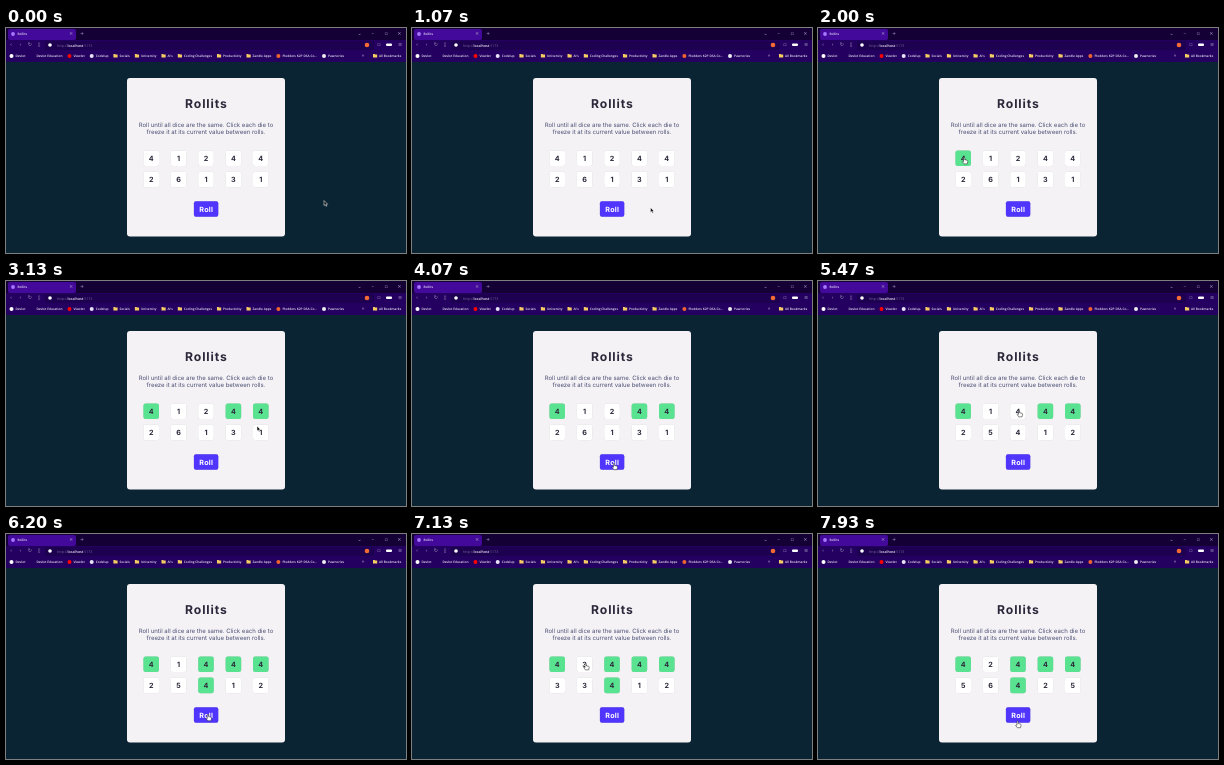
An HTML page that plays this animation: 400 by 225 pixels, repeating every 8 s.

```html
<!DOCTYPE html>
<html lang="en">
<head>
<meta charset="utf-8">
<title>Rollits</title>
<style>
  html, body { margin: 0; width: 100%; height: 100%; overflow: hidden; background: #0b2434; }
  svg { display: block; width: 100vw; height: 100vh; }
  text { text-rendering: geometricPrecision; }
  .ui { font: 600 3.2px "Open Sans", "Noto Sans", sans-serif; fill: #efeaf8; }
  .glyph { font: 5px "DejaVu Sans", sans-serif; text-anchor: middle; dominant-baseline: central; fill: #a99cc4; }
  .game { font-family: Inter, Arial, sans-serif; text-anchor: middle; }
  .bold { font-size: 7.2px; font-weight: 700; }
  .die rect, #roll { filter: drop-shadow(0 .6px .5px #0003); }
</style>
</head>
<body>
<svg viewBox="0 0 400 225">
  <rect width="400" height="225" fill="#0b2434"/>
  <g id="chrome" class="ui">
    <rect width="400" height="34" fill="#240060"/>
    <rect width="400" height="12" fill="#150036"/>
    <rect x="2" y="1" width="68" height="11" rx="2" fill="#43099a"/>
    <rect x="39" y="13" width="329" height="9" rx="2" fill="#1d0050"/>
    <circle cx="7" cy="6" r="1.9" fill="#a878ff"/>
    <text x="11.5" y="7.2">Rollits</text>
    <circle cx="44" cy="17" r="1.8" fill="#fff"/>
    <text x="51" y="18.6" font-size="3.6" font-weight="400" fill="#75659a">http://<tspan
      font-weight="600" fill="#f2eefa">localhost</tspan>:5173</text>
    <circle cx="361" cy="17" r="2.3" fill="#f26b35"/>
    <rect x="380" y="15.5" width="6" height="2.500" rx="1" fill="#fff"/>
  </g>

  <g class="game">
    <rect x="121" y="50" width="158" height="158.600" rx="3" fill="#f4f2f5"/>
    <text x="200.400" y="80.200" font-size="12.200" font-weight="700" letter-spacing=".9" fill="#2b283a">Rollits</text>
    <g font-size="6" fill="#4a4e74">
      <text x="200" y="99.300">Roll until all dice are the same. Click each die to</text>
      <text x="200" y="106.300">freeze it at its current value between rolls.</text>
    </g>
    <g id="dice" class="bold" fill="#2b283a"></g>
    <rect id="roll" x="187.900" y="173.200" width="24.400" height="15.600" rx="2" fill="#5035ff"/>
    <text class="bold" x="200.200" y="183.700" letter-spacing=".2" fill="#fff">Roll</text>
  </g>

  <g id="cursor" stroke-width=".5" stroke-linejoin="round">
    <path id="arrow" fill="#111" stroke="#fff" d="M0 0V5L1.200 4 2 5.800 2.900 5.400 2.100 3.700H3.600z"/>
    <path id="hand" fill="#fff" stroke="#111" d="M-.6 .5Q0-.4 .6 .5V2.500L3 3.100Q3.700 3.300 3.600 4.300L3 6.700H-.2L-1.800 4.500Q-1.600 3.500-.6 4.300z"/>
  </g>
</svg>
<script>
const $ = id => document.getElementById(id);
const LOOP = 8000, FRAME = 1000 / 15;

// Browser bar
const glyph = (char, x, y) => `<text class="glyph" x="${x}" y="${y}">${char}</text>`;
const row = (chars, x, step, y) => [...chars].map((c, i) => glyph(c, x + i * step, y)).join("");
$("chrome").innerHTML += row("×+", 65, 11, 6) + row("⌄–▫×", 353.5, 13.3, 6) +
  row("‹›↻▯", 5, 9.4, 17) + row("▫", 373, 0, 17) + row("≡", 394, 0, 17);

function bookmark(x, label, color) {
  const icon = color ? `<circle cx="${x}" cy="28" r="2" fill="${color}"/>`
    : `<path d="M${x - 2} 26h1.600l.6.600h2v3h-4.200z" fill="#f5cd62"/>`;
  $("chrome").insertAdjacentHTML("beforeend", `${icon}<text x="${x + 4}" y="29.200">${label}</text>`);
  return x + 11 + $("chrome").lastElementChild.getComputedTextLength();
}
[["Devlot", "#fff"], ["Devlot Education", "#240060"], ["Viewlet", "#f00"], ["Codelup", "#e9e4f5"],
 ["Socials"], ["University"], ["AI's"], ["Coding Challenges"], ["Productivity"], ["Zandle Apps"],
 ["Plodders K2P DSA Co...", "#f0652f"], ["Pawnories", "#eee"]
].reduce((x, mark) => bookmark(x, ...mark), 5.5);
$("chrome").innerHTML += glyph("»", 357, 28);
bookmark(369, "All Bookmarks");

// Dice grid
const spots = Array.from({ length: 10 }, (_, i) => [145.2 + i % 5 * 27.4, i < 5 ? 130.2 : 151.4]);
$("dice").innerHTML = spots.map(([x, y]) =>
  `<g class="die"><rect x="${x - 7.8}" y="${y - 7.8}" width="15.6" height="15.6" rx="2.3"/>
   <text x="${x}" y="${y + 2.6}"></text></g>`).join("");
const dice = [...$("dice").children];

// Pointer stops: time, place (die index or point), then "hold" or the rolled values
const button = [202, 182], start = "4124426131";
const stops = [
  [600, [318, 172.5]],
  [1000, [245, 183]],
  [1500, 0],
  [2000, 0, "hold"],
  [2530, 3, "hold"],
  [2860, 4, "hold"],
  [3130, [251, 145]],
  [4730, button, "4144425412"],
  [5600, 2, "hold"],
  [5860, 7, "hold"],
  [6330, button, "4344433412"],
  [7130, 1],
  [7530, button, "4244456425"],
  [7930, [199.5, 187]]
];
const place = spot => Array.isArray(spot) ? spot : [spots[spot][0] + 1, spots[spot][1] - 1];

// Glide to the next stop, then rest there until its time comes
function pointer(t) {
  const next = stops.findIndex(([time]) => time > t);
  if (next < 1) return place(stops.at(next)[1]);
  const [[t0, a], [t1, b]] = stops.slice(next - 1, next + 1);
  const [x0, y0] = place(a), [x1, y1] = place(b);
  const u = Math.min(1, (t - t0) / Math.min(850, (t1 - t0) * .85));
  const ease = u * u * (3 - 2 * u);
  return [x0 + (x1 - x0) * ease, y0 + (y1 - y0) * ease];
}

function draw(t) {
  const done = stops.filter(([time, , action]) => action && time <= t + 5);
  const held = done.filter(s => s[2] === "hold").map(s => s[1]);
  const values = done.findLast(s => s[2] !== "hold")?.[2] ?? start;
  dice.forEach((die, i) => {
    die.firstElementChild.setAttribute("fill", held.includes(i) ? "#59e391" : "#fff");
    die.lastElementChild.textContent = values[i];
  });
  const [x, y] = pointer(t);
  const over = (cx, cy, w, h) => Math.abs(x - cx) < w && Math.abs(y - cy) < h;
  const hover = over(200, 181, 12.5, 8) || spots.some(([cx, cy]) => over(cx, cy, 8, 6));
  $("cursor").setAttribute("transform", `translate(${x} ${y})`);
  $("hand").style.display = hover ? "" : "none";
  $("arrow").style.display = hover ? "none" : "";
}

function tick() {
  const t = performance.now() % LOOP;
  draw(Math.floor((t + 5) / FRAME) * FRAME);
  requestAnimationFrame(tick);
}
tick();
</script>
</body>
</html>
```
